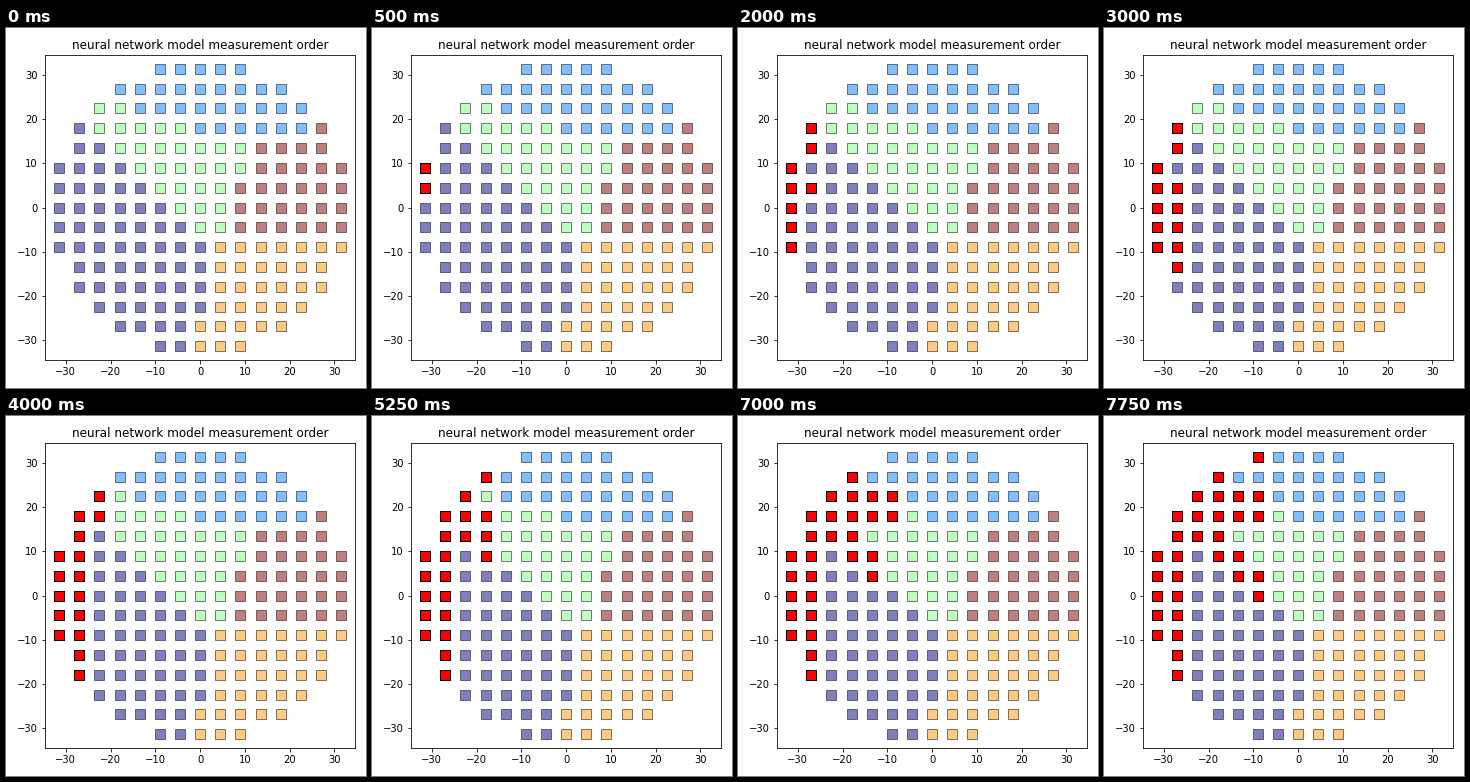
Recreate the animation shown at these times as a matplotlib script. Size 360 px wide and 360 px high, loop 8000 ms.

```python
import numpy as np
import matplotlib.pyplot as plt
from matplotlib.animation import FuncAnimation

STEP = 4.5
RADIUS = 7
FRAMES, INTERVAL = 32, 250

# Disc of grid cells, addressed by column and row from the centre
grid = np.arange(-RADIUS, RADIUS + 1)
col, row = (axis.ravel() for axis in np.meshgrid(grid, grid))
disc = col**2 + row**2 < (RADIUS + 0.4) ** 2
col, row = col[disc], row[disc]

# Regions are cut out by straight lines, first match wins
region = np.select(
    [
        (col + row <= -2) & (5 * col <= row + 5),
        row <= -2,
        (3 * col <= row + 4) & (col + 3 * row <= 11),
        3 * row <= col + 6,
    ],
    [0, 3, 2, 4],
    default=1,
)

# Measured cells: left rim, top row and bands along two region borders
left_border = np.isin(col + row, (-2, -1))
top_border = abs(col + 3 * row - 11) <= 3
chosen = (col <= -6) | (row == RADIUS) | left_border | top_border


def column_order(c):
    """Top to bottom; even columns keep one cell for last, each time a rank higher."""
    rows = sorted(row[chosen & (col == c)], reverse=True)
    if c % 2 == 0:
        rows.append(rows.pop(-c // 2 - 1))
    return [(c, r) for r in rows]


path = STEP * np.array([cell for c in range(-RADIUS, -1) for cell in column_order(c)])

fig, ax = plt.subplots(figsize=(5, 5), dpi=72)
square = dict(marker="s", s=100, edgecolors="k", linewidths=1)
ax.scatter(STEP * col, STEP * row, c=region, cmap="jet", alpha=0.5, **square)
measured = ax.scatter([], [], c="r", **square)

limit = RADIUS * STEP * 1.1
ax.set(xlim=(-limit, limit), ylim=(-limit, limit))
ax.set_title("neural network model measurement order")
fig.tight_layout()
fig.subplots_adjust(left=39 / 360)


def update(frame):
    measured.set_offsets(path[:frame])
    return [measured]


anim = FuncAnimation(fig, update, frames=FRAMES, interval=INTERVAL, repeat=True)
plt.show()
```
